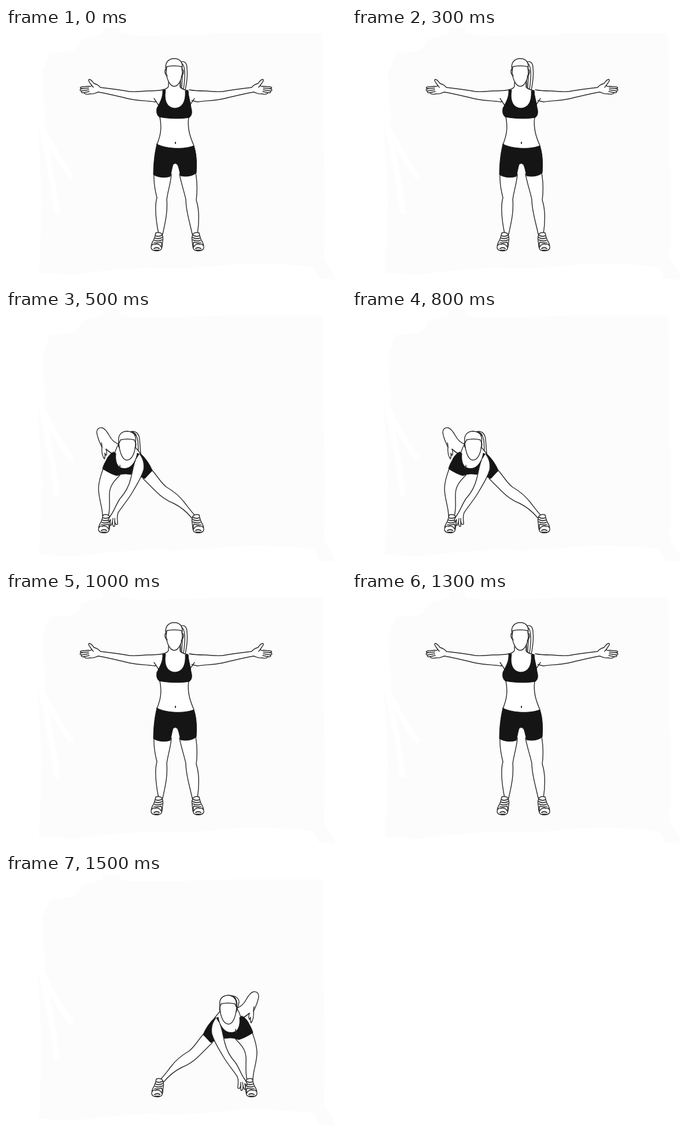
Recreate the animation shown at these times as an HTML page. Size 588 px wide and 440 px high, loop 2 s.

```html
<!DOCTYPE html>
<html lang="en">
<head>
<meta charset="utf-8">
<title>Side lunge exercise</title>
<style>
html, body { margin: 0; width: 100%; height: 100%; overflow: hidden; background: #fff; }
svg { display: block; width: 588px; height: 440px; }
.ink { fill: #fff; stroke: #2c2c2c; stroke-width: 1.4; stroke-linecap: round; stroke-linejoin: round; }
.line { fill: none; }
.wear { fill: #151515; stroke: #151515; stroke-width: 1; }
</style>
</head>
<body>
<svg viewBox="0 0 588 440">
  <defs>
    <!-- front view of a shoe, centred on x = 0 -->
    <g id="shoe">
      <path d="M-2 355C-3 360-4 364-6 368C-9 372-10 376-10 381C-9 385-5 386 0 386C4 386 7 385 8 382C10 377 9 373 10 369C11 364 10 359 8 356C5 354 1 354-2 355Z"/>
      <path class="line" stroke-width="1.7" d="M-2 360Q3 362 9 359M-3 364Q3 366 9 363M-4 368Q2 370 9 367M-5 372Q1 373 7 371"/>
      <path class="line" d="M-9 377Q-7 373-4 375Q1 373 5 376L8 380M7 371Q9 374 8 378"/>
      <path class="line" stroke-width="2" d="M-5 382Q0 379 4 382M-4 385H3"/>
    </g>
    <g id="arm">
      <path d="M271 107C262 109 253 109 244 109C233 110 222 111 213 110C196 107 180 105 163 103C161 99 155 97 152 96C150 93 147 89 144 89C141 90 145 95 148 99C148 101 146 102 143 101L131 102C127 103 128 105 132 105C127 106 127 109 131 109C129 111 131 113 135 112C136 115 141 115 146 114C152 115 155 112 160 111C178 114 196 119 214 123C229 126 244 126 257 128L274 124"/>
      <path class="line" d="M131 105L143 104M131 109L143 107M135 112L144 110M148 99Q150 101 151 103"/>
    </g>
    <g id="lunge">
      <path d="M196 233C188 230 182 224 179 218C175 211 171 205 166 204C160 203 157 207 157 212C158 222 163 231 166 238C165 246 167 253 170 258C172 255 171 251 171 248L173 252C175 249 174 244 173 241L182 248L198 253Z"/>
      <path class="line" d="M166 238Q166 233 165 230M173 241Q178 246 184 249"/>
      <path d="M253 278C263 289 268 300 278 307C290 314 300 322 309 334C316 343 321 350 327 356L321 360C312 349 302 341 290 335C277 330 268 323 260 315L237 292Z"/>
      <path d="M168 275C164 286 160 297 160 309C160 327 167 341 167 357L177 357C181 341 178 328 179 317C180 304 187 296 197 286Z"/>
      <path class="wear" d="M232 248Q246 261 253 278L240 292L231 288Z"/>
      <path d="M195 232C190 240 187 249 187 258L195 278L220 279L233 249L224 238Z"/>
      <path class="wear" d="M186 246C180 249 176 254 173 261C170 266 168 271 167 275C175 280 184 285 192 287C199 284 205 283 216 285L221 276L231 250L227 248C226 257 221 267 214 272C207 276 199 275 195 271C190 266 189 257 190 249Z"/>
      <path class="line" d="M195 275Q198 272 197 269"/>
      <use href="#shoe" x="170"/>
      <use href="#shoe" transform="translate(332) scale(-1 1)"/>
      <path d="M231 249C237 257 240 266 238 277C234 291 226 303 219 315C211 329 201 340 194 351C191 357 193 364 193 371C190 373 189 370 188 366L188 374C186 377 184 373 184 367L182 373C179 374 180 368 181 363L178 366C175 365 180 357 183 353C188 345 191 336 197 327C207 316 213 304 216 291C219 280 220 269 224 260"/>
      <path class="line" d="M188 366L188 361M184 367L185 361"/>
      <path d="M195 229C193 216 200 210 210 210C221 211 226 217 224 230C224 244 219 260 209 260C201 260 196 245 195 229Z"/>
      <path class="line" d="M196 230L198 225Q210 222 222 225L224 230M195 229Q193 234 196 239M224 229Q226 234 223 239"/>
    </g>
  </defs>

  <path fill="#fcfcfc" d="M62 78L76 43L110 41Q128 36 130 20L168 9V0H196V8Q225 16 260 13L400 9L547 9L551 300L550 400L568 426L569 436L541 434L532 414Q430 404 380 411Q300 419 250 415Q160 420 120 427L57 424L62 300L55 170L68 160Z"/>
  <path fill="none" stroke="#fff" stroke-width="10" stroke-linecap="round" d="M60 165Q78 240 88 318M62 170Q86 222 112 256"/>

  <g class="ink">
    <g class="pose">
      <path d="M302 59C309 56 313 61 313 70C315 84 312 96 310 108L302 103Z"/>
      <path class="line" d="M304 61C312 67 309 91 307 106M303 66C307 78 304 91 304 103"/>
      <use href="#arm"/>
      <use href="#arm" transform="translate(588) scale(-1 1)"/>
      <path d="M256 253C255 269 258 282 261 294C256 312 260 337 264 357L271 357C275 338 280 319 278 297C280 282 285 268 286 253Z"/>
      <path d="M300 253C303 269 308 283 311 297C311 317 318 337 322 357L331 357C334 337 335 316 329 298C331 283 331 268 328 251Z"/>
      <path stroke="none" d="M281 92V102L271 107L259 129L266 155C270 174 266 189 261 203L293 213L326 204C317 190 313 173 316 155L323 130L312 108L301 104V94Z"/>
      <path class="line" d="M281 94V101C280 104 276 106 271 107M301 95V102C303 105 308 107 313 108M256 122L264 134M326 122L319 132M266 154C270 174 267 187 261 202M316 154C313 174 319 190 325 204"/>
      <path class="wear" d="M271 108C272 120 266 129 261 139C260 146 261 151 265 154C281 157 301 158 317 155C322 151 322 145 320 138C319 127 315 118 315 108L310 109C311 122 308 138 292 139C277 138 273 123 276 108Z"/>
      <path class="wear" d="M261 201C272 208 304 212 325 204C330 219 330 236 329 251C322 257 311 258 302 256C300 249 299 240 296 236Q293 233 289 236C287 242 286 250 284 257C275 260 263 259 255 254C255 236 257 217 261 201Z"/>
      <path class="line" stroke-width="2" d="M293 198V200"/>
      <path d="M277 73C274 61 280 53 291 53C302 53 307 61 304 73Z"/>
      <path d="M278 67Q291 64 304 67L305 77C304 88 299 101 291 101C283 101 278 88 277 77Z"/>
      <path class="line" d="M277 71C273 73 275 81 279 83M304 71C309 73 307 81 303 84"/>
      <use href="#shoe" x="261"/>
      <use href="#shoe" transform="translate(332) scale(-1 1)"/>
    </g>
    <g class="pose">
      <path d="M215 211C224 208 230 214 231 224L233 249L226 247Z"/>
      <path class="line" d="M221 213C230 220 228 232 229 246"/>
      <use href="#lunge"/>
      <path class="line" stroke-width="2.2" d="M217 211Q222 212 225 217"/>
    </g>
    <g class="pose">
      <path d="M387 212C395 209 403 215 403 222L401 231L394 230Z"/>
      <use href="#lunge" transform="translate(594) scale(-1 1)"/>
      <path class="line" d="M393 213Q400 219 398 229"/>
      <path class="line" stroke-width="2.2" d="M389 211Q395 212 397 217"/>
    </g>
  </g>
</svg>
<script>
const STEP = 500;
const order = [0, 1, 0, 2];
const poses = document.querySelectorAll('.pose');

function draw(ms) {
  const shown = order[Math.floor(ms / STEP) % order.length];
  poses.forEach((pose, i) => pose.setAttribute('display', i === shown ? 'inline' : 'none'));
}

let start;
function tick(now) {
  start ??= now;
  draw(Math.max(0, now - start));
  requestAnimationFrame(tick);
}
draw(0);
requestAnimationFrame(tick);
</script>
</body>
</html>
```
